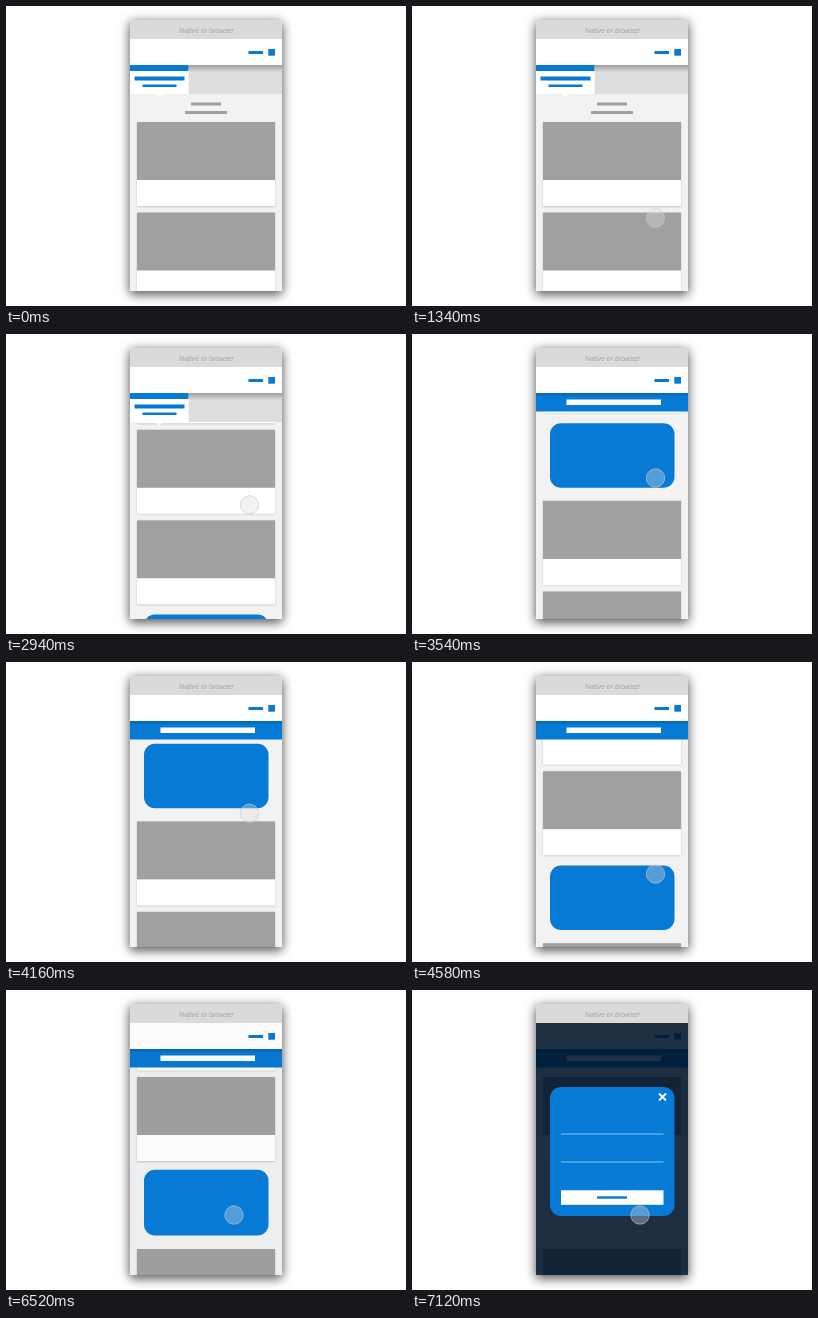
Animation, 400 px wide and 300 px high, one loop 8000 ms. Source, as an HTML page with a canvas:

```html
<!DOCTYPE html>
<html lang="en">
<head>
<meta charset="utf-8">
<style>
html, body { margin: 0; width: 100%; height: 100%; overflow: hidden; background: #fff; }
canvas { display: block; width: 400px; height: 300px; }
</style>
</head>
<body>
<canvas width="400" height="300"></canvas>
<script>
const ctx = document.querySelector('canvas').getContext('2d');
const LOOP = 8000, BLUE = '#067ad5', GRAY = '#a0a0a0';
const LEFT = 124, WIDTH = 152, BOTTOM = 285;

const clamp = v => Math.max(0, Math.min(1, v));
const mix = (a, b, p) => a + (b - a) * p;
const progress = (t, from, to) => clamp((t - from) / (to - from));
const easeInOut = p => p < .5 ? 4 * p ** 3 : 1 - 4 * (1 - p) ** 3;

// Smooth monotone curve through [time, value] keys.
function track(keys) {
  const slope = keys.slice(1).map(([t, v], i) => (v - keys[i][1]) / (t - keys[i][0]));
  const tangent = keys.map((_, i) => {
    const a = slope[i - 1] || 0, b = slope[i] || 0;
    return a * b > 0 ? 2 * a * b / (a + b) : 0;
  });
  return t => {
    if (t <= keys[0][0]) return keys[0][1];
    const i = keys.findIndex(k => k[0] >= t) - 1;
    if (i < 0) return keys[keys.length - 1][1];
    const [t0, v0] = keys[i], [t1, v1] = keys[i + 1];
    const d = t1 - t0, p = (t - t0) / d, q = 1 - p;
    return v0 * q * q * (1 + 2 * p) + v1 * p * p * (3 - 2 * p)
      + d * p * q * (tangent[i] * q - tangent[i + 1] * p);
  };
}

const scrollAt = track([[1720, 0], [2300, 41], [2520, 68], [2700, 68.5], [2940, 110.5],
  [3540, 302], [3960, 314], [4100, 314], [4580, 188], [4900, 145], [4920, 145], [5260, 210]]);
const fingerAt = track([[1720, 212], [2300, 175], [2520, 147], [2540, 147], [2760, 212],
  [2940, 171], [3120, 144], [4100, 144], [4400, 212], [4920, 212], [5260, 147]]);
const stickyAt = track([[3130, 0], [3330, 1], [4680, 1], [4880, 0], [5060, 0], [5260, 1]]);

function rect(x, y, w, h, color) {
  ctx.fillStyle = color;
  ctx.fillRect(x, y, w, h);
}

function panel(x, y, w, h, r) {
  ctx.fillStyle = BLUE;
  ctx.beginPath();
  ctx.roundRect(x, y, w, h, r);
  ctx.fill();
}

function shade(y, h, alpha) {
  const g = ctx.createLinearGradient(0, y, 0, y + h);
  g.addColorStop(0, `rgba(0,0,0,${alpha})`);
  g.addColorStop(1, 'rgba(0,0,0,0)');
  rect(LEFT, y, WIDTH, h, g);
}

function withShadow(color, blur, dy, draw) {
  ctx.save();
  ctx.shadowColor = color;
  ctx.shadowBlur = blur;
  ctx.shadowOffsetY = dy;
  draw();
  ctx.restore();
}

function phone() {
  const body = () => rect(LEFT, 14, WIDTH, BOTTOM - 14, '#f2f2f2');
  withShadow('rgba(0,0,0,.3)', 10, 1, body);
  withShadow('rgba(0,0,0,.5)', 10, 4, body);
}

function card(y) {
  withShadow('rgba(0,0,0,.2)', 2, .5, () => rect(131, y, 138, 84, '#fff'));
  rect(131, y, 138, 58, GRAY);
}

function feed(scroll, showOffer) {
  rect(185, 96.5 - scroll, 30, 3, GRAY);
  rect(179, 105 - scroll, 42, 3, GRAY);
  for (const y of [116, 206.5, 297, 469, 559.5]) card(y - scroll);
  if (showOffer) panel(138, 391.3 - scroll, 124.5, 64.5, 11);
}

function tabs() {
  rect(LEFT, 59, WIDTH, 29, '#dedede');
  shade(59, 7, .3);
  rect(LEFT, 59, 58.5, 29, '#fff');
  rect(LEFT, 59, 58.5, 6, BLUE);
  rect(128.5, 70.5, 50, 4, BLUE);
  rect(136.5, 78.5, 34, 2.5, BLUE);
  ctx.fillStyle = '#fff';
  ctx.beginPath();
  ctx.moveTo(149.5, 88);
  ctx.lineTo(157, 88);
  ctx.lineTo(153.2, 91.5);
  ctx.fill();
}

function stickyBar() {
  rect(LEFT, 59, WIDTH, 18.5, BLUE);
  shade(59, 4, .18);
  rect(154.5, 65.5, 94.5, 5.5, '#fff');
}

function header() {
  rect(LEFT, 33, WIDTH, 26, '#fff');
  rect(242.5, 45, 14.5, 3, BLUE);
  rect(262.3, 43, 6.7, 6.7, BLUE);
}

function titleBar() {
  rect(LEFT, 14, WIDTH, 19, '#dadada');
  ctx.fillStyle = '#a3a3a3';
  ctx.font = 'italic 7px "Liberation Sans", Arial, sans-serif';
  ctx.textAlign = 'center';
  ctx.fillText('Native or browser', 200.5, 26.5);
}

function dialog(p) {
  panel(138, mix(181.3, 97, p), 124.5, mix(64.5, 129, p), 11);
  ctx.save();
  ctx.globalAlpha = clamp(p * 2 - 1);
  ctx.strokeStyle = '#fff';
  ctx.lineWidth = 1.8;
  ctx.beginPath();
  ctx.moveTo(247, 103.5);
  ctx.lineTo(254, 110.5);
  ctx.moveTo(254, 103.5);
  ctx.lineTo(247, 110.5);
  ctx.stroke();
  for (const y of [143.5, 171.5]) rect(149, y, 102.5, 1, 'rgba(255,255,255,.55)');
  rect(149, 200.3, 102.5, 14.5, '#fff');
  rect(185, 206.3, 30, 2.4, BLUE);
  ctx.restore();
}

function finger(t) {
  const move = 1 - (1 - progress(t, 5600, 5940)) ** 3;
  const x = mix(243.5, 228, move * move);
  const y = mix(fingerAt(t), 225, move);
  const press = Math.sin(Math.PI * progress(t, 6100, 6240));
  ctx.save();
  ctx.globalAlpha = progress(t, 500, 1140);
  ctx.beginPath();
  ctx.arc(x, y, 9.2 - press, 0, 2 * Math.PI);
  ctx.fillStyle = 'rgba(222,222,222,.36)';
  ctx.fill();
  ctx.strokeStyle = 'rgba(200,200,200,.65)';
  ctx.lineWidth = 1;
  ctx.stroke();
  ctx.restore();
}

function draw(t) {
  const open = easeInOut(progress(t, 6400, 7120));
  const sticky = stickyAt(t);
  rect(0, 0, 400, 300, '#fff');
  phone();
  ctx.save();
  ctx.beginPath();
  ctx.rect(LEFT, 14, WIDTH, BOTTOM - 14);
  ctx.clip();
  feed(scrollAt(t), open === 0);
  ctx.globalAlpha = 1 - sticky;
  if (sticky < 1) tabs();
  ctx.globalAlpha = sticky;
  if (sticky > 0) stickyBar();
  ctx.globalAlpha = 1;
  header();
  rect(LEFT, 33, WIDTH, BOTTOM - 33, `rgba(0,20,40,${.88 * open})`);
  titleBar();
  if (open > 0) dialog(open);
  finger(t);
  ctx.restore();
}

const start = performance.now();
function frame() {
  draw((performance.now() - start) % LOOP);
  requestAnimationFrame(frame);
}
frame();
</script>
</body>
</html>
```
